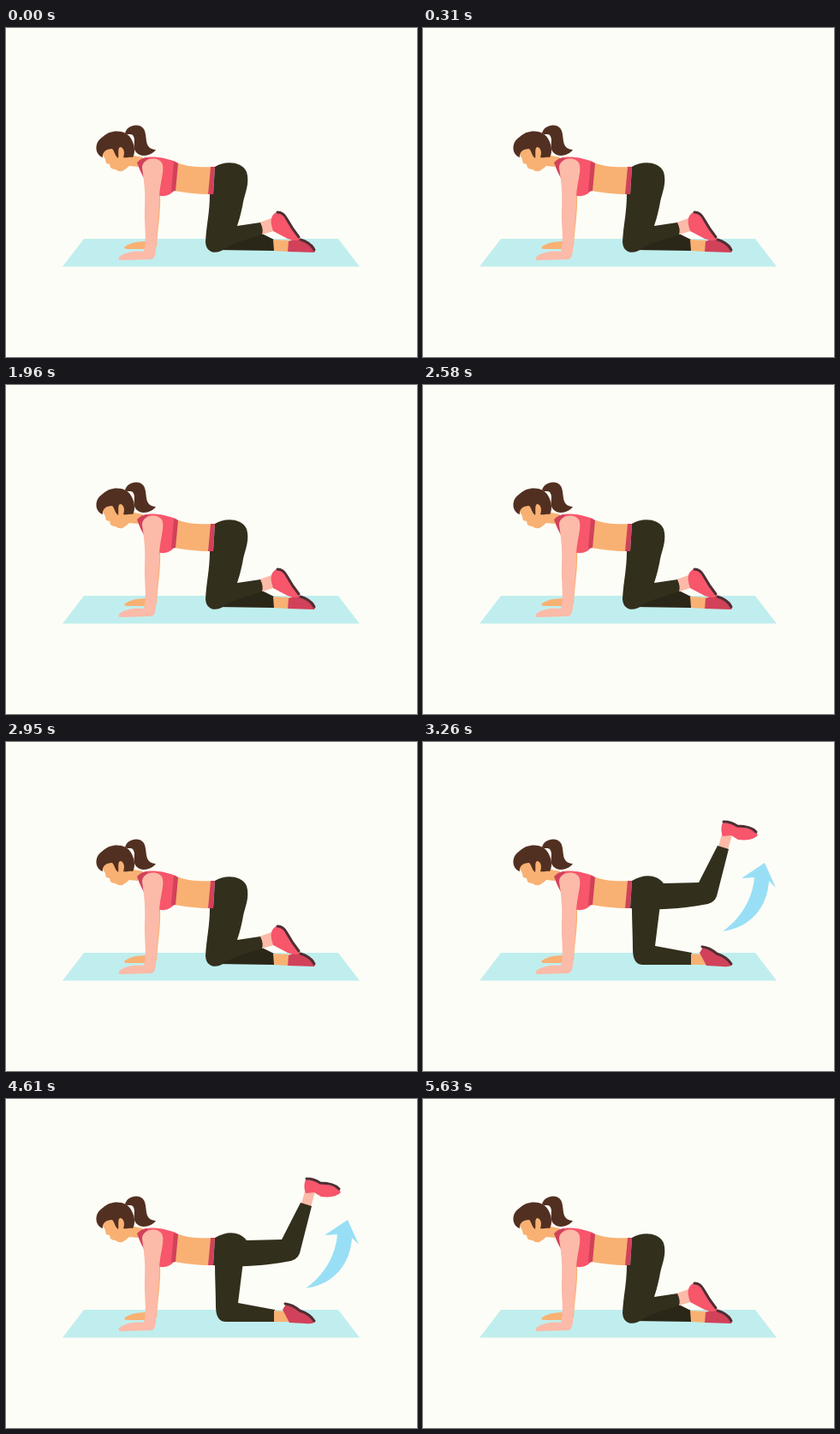
An HTML page for the animation above (5650 ms loop, 480x384 px).

```html
<!DOCTYPE html>
<html lang="en">
<head>
<meta charset="utf-8">
<title>Donkey kicks</title>
<style>
  html, body { margin: 0; width: 100%; height: 100%; overflow: hidden; background: #fdfdf7; }
  svg { display: block; width: 100vw; height: 100vh; }
  .mat { fill: #c0eeee; }
  .skin { fill: #f8b173; }
  .near { fill: #fcbaa8; }
  .top { fill: #f7566b; }
  .trim { fill: #d2415a; }
  .hair { fill: #523021; }
  .pants { fill: #332f1d; }
  .far { fill: #2b2718; }
  .arrow { fill: #98dff6; }
  .sole { fill: none; stroke: #4d2f33; stroke-width: 3; stroke-linecap: round; }
</style>
</head>
<body>
<svg viewBox="0 0 480 384">
  <path class="mat" d="M91 246H388L413 278.500H66Z"/>

  <!-- far arm and hand -->
  <path class="skin" d="M172 190L180 194C181 214 177 234 176 255L164 258H143Q136 258 139 255Q147 249 163 249Z"/>

  <!-- torso -->
  <path class="skin" d="M199 157C212 162 228 163 241 162L238 194C222 194 210 192 196 190Z"/>
  <path class="top" d="M154 157C158 149 178 148 200 157L196 190C190 197 182 197 176 195L163 180Z"/>
  <path class="trim" d="M196 156L201 158L198 190L193 191Z"/>
  <path class="trim" d="M239 162H244L242 194H236Z"/>

  <!-- head -->
  <path class="hair" d="M139 123C141 113 156 110 161 118C166 127 160 141 175 142C171 148 159 152 153 146C146 140 153 131 148 125C146 123 142 125 139 123Z"/>
  <path class="skin" d="M111 143C112 149 116 151 116 154L117 158L121 159L122 163Q124 165 128 165Q131 168 136 167Q141 164 144 161L154 162L160 151L150 149L140 138L125 135Z"/>
  <path class="hair" d="M113 151C104 148 102 134 113 127C123 117 141 119 146 129C151 138 151 146 148 151C145 150 141 152 137 151C139 146 138 139 133 139C130 141 132 148 131 152C127 149 127 144 124 141C117 141 112 145 113 151Z"/>

  <!-- near arm -->
  <path class="trim" d="M153 157Q158 151 166 151L160 163L163 178Q157 169 153 157Z"/>
  <path class="near" d="M159 163C159 150 181 149 183 160C185 170 178 185 179 205L175 260Q174 269 170 270L133 271Q129 269 135 265Q147 259 161 261C165 248 161 228 162 210C163 190 161 178 159 163Z"/>

  <g id="down">
    <path class="far" d="M245 259L262 242L299 240L313 247V260Z"/>
    <path class="skin" d="M312 247L331 248L329 261L313 260Z"/>
    <path class="trim" d="M330 249Q343 242 358 253Q363 259 360 262L329 261Z"/>
    <path class="sole" d="M344 247Q355 250 360 259"/>
    <path class="near" d="M296 227L310 222L316 236L299 241Z"/>
    <path class="top" d="M314 216C307 222 310 230 312 237L329 246Q340 250 343 246C340 238 330 228 325 218Q320 212 314 216Z"/>
    <path class="sole" d="M317 215Q324 215 328 223Q334 234 342 244"/>
    <path class="pants" d="M244 162C255 155 275 155 281 168C285 181 279 193 277 203C275 215 272 225 270 231L297 227Q301 235 299 241C285 246 265 250 255 258C247 264 234 264 233 250C234 230 238 215 238 194H242Z"/>
  </g>

  <g id="up">
    <path class="pants" d="M244 190C244 210 245 225 245 242Q245 260 257 260H313L314 246L271 238L277 190Z"/>
    <path class="skin" d="M313 247L329 248L331 260H313Z"/>
    <path class="trim" d="M323 246L328 238Q337 242 343 247Q355 252 361 260Q358 263 350 262L331 261Z"/>
    <path class="sole" d="M326 239Q335 240 343 247Q355 251 360 259"/>
    <path class="near" d="M345 122L350 104L361 108L356 126Z"/>
    <path class="top" d="M350 94C347 101 349 107 350 110L360 109L368 114Q385 116 391 109Q389 102 375 100L360 95Z"/>
    <path class="sole" d="M351 93Q360 93 367 98Q383 98 389 105"/>
    <path class="pants" d="M244 162C258 154 272 154 281 165L322 164L344 121L357 125L343 180Q340 189 327 190C300 195 265 197 242 194Z"/>
    <path class="arrow" d="M350 221C370 207 385 184 387 158L372 159L399 141L412 170L404 162C402 192 384 216 350 221Z"/>
  </g>
</svg>
<script>
  const LOOP = 5650;
  const lifts = [[435, 1880], [3255, 4670]];
  const down = document.getElementById('down');
  const up = document.getElementById('up');

  function draw() {
    const t = performance.now() % LOOP;
    const raised = lifts.some(([from, to]) => t >= from && t < to);
    up.style.display = raised ? '' : 'none';
    down.style.display = raised ? 'none' : '';
    requestAnimationFrame(draw);
  }
  draw();
</script>
</body>
</html>
```
